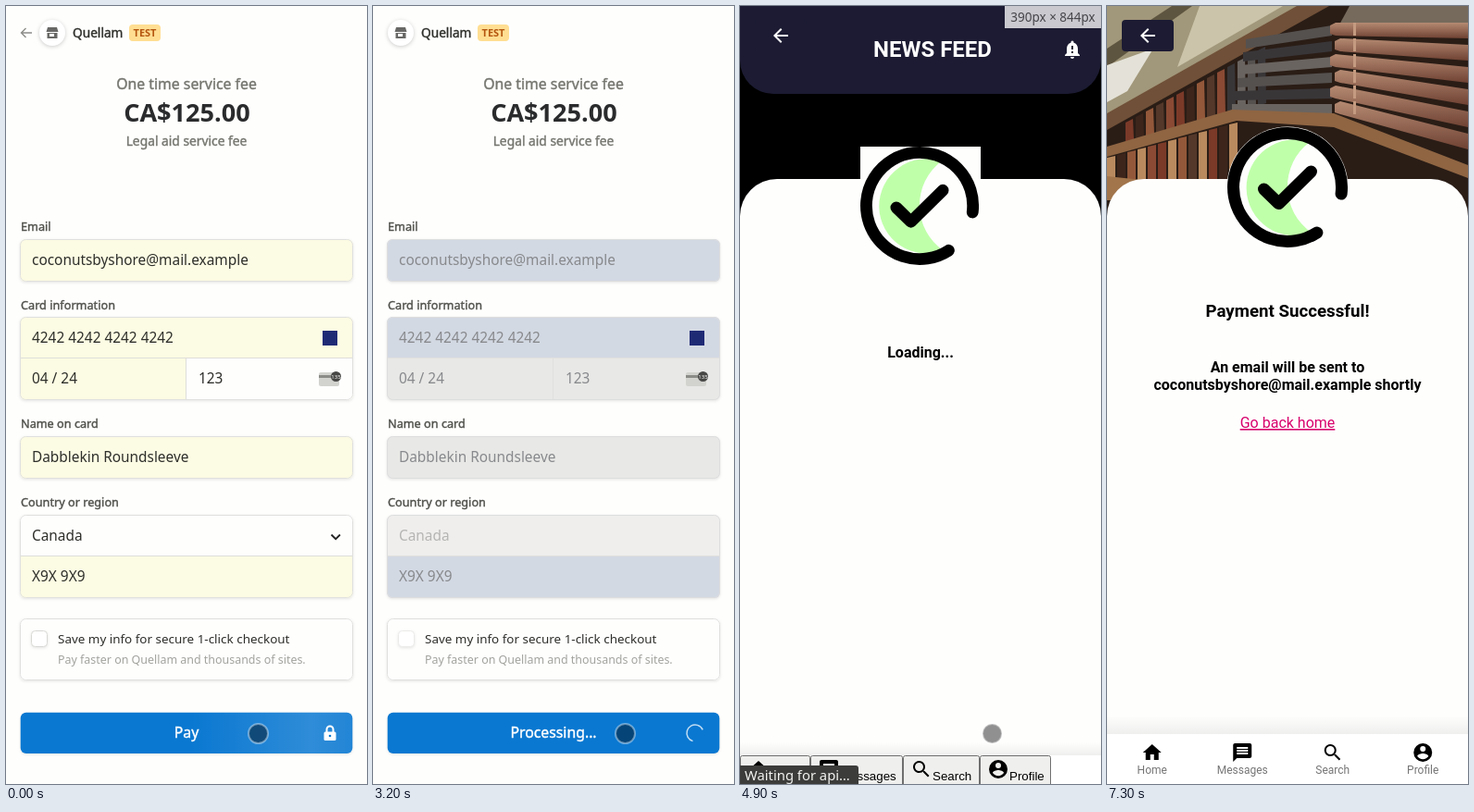
Animation of 390 by 841 pixels, one loop 7.9 s. Source, as an HTML page:

```html
<!DOCTYPE html>
<html lang="en">
<head>
<meta charset="utf-8">
<title>Checkout</title>
<style>
  html, body { margin: 0; width: 100%; height: 100%; overflow: hidden; background: #fefefd; }
  svg { display: block; }
  text { font-family: "Noto Sans", "Open Sans", sans-serif; white-space: pre; stroke-width: 0; }
  .mid { text-anchor: middle; }
  .med { stroke-width: .4px; }
  .bold { font-weight: 700; }
  .rob { font-family: Roboto, sans-serif; }
  .arial { font-family: "Liberation Sans", Arial, sans-serif; }
  .lift { filter: drop-shadow(0 1px 1.5px rgba(0,0,0,.1)); }
  .cells { clip-path: inset(0 round 6px); }
</style>
</head>
<body>
<svg id="stage" width="390" height="841" viewBox="0 0 390 841"></svg>
<script>
const LOOP = 7900, STEP = 100;
const PAPER = '#fefefd', NAVY = '#1c1b33', EMAIL = 'coconutsbyshore@mail.example', SHOP = 'Quellam';

const ICONS = {
  back: 'M20 11H7.83l5.59-5.59L12 4l-8 8 8 8 1.41-1.41L7.83 13H20z',
  home: 'M10 20v-6h4v6h5v-8h3L12 3 2 12h3v8z',
  chat: 'M20 2H4c-1.1 0-2 .9-2 2v18l4-4h14c1.1 0 2-.9 2-2V4c0-1.1-.9-2-2-2zm-2 12H6v-2h12zm0-3H6V9h12zm0-3H6V6h12z',
  find: 'M15.5 14h-.79l-.28-.27A6.5 6.5 0 1 0 13.73 14.43l.27.28v.79l5 4.99L20.49 19zm-6 0a4.5 4.5 0 1 1 0-9 4.5 4.5 0 0 1 0 9z',
  user: 'M12 2a10 10 0 1 0 0 20 10 10 0 0 0 0-20zm0 3a3 3 0 1 1 0 6 3 3 0 0 1 0-6zm0 14.2c-2.5 0-4.71-1.28-6-3.22.03-1.99 4-3.08 6-3.08s5.97 1.09 6 3.08c-1.29 1.94-3.5 3.22-6 3.22z',
  bell: 'M18 16v-5c0-3.07-1.64-5.64-4.5-6.32V4a1.5 1.5 0 0 0-3 0v.68C7.63 5.36 6 7.92 6 11v5l-2 2v1h16v-1zm-5 0h-2v-2h2zm0-4h-2V8h2zm-1 10a2 2 0 0 0 2-2h-4a2 2 0 0 0 2 2z'
};
const NAV = [['home', 'Home'], ['chat', 'Messages'], ['find', 'Search'], ['user', 'Profile']];

// Drawing helpers, all returning SVG markup
const text = (x, y, size, str, fill, cls = '', more = '') =>
  `<text x="${x}" y="${y}" font-size="${size}" fill="${fill}" stroke="${fill}" class="${cls}" ${more}>${str}</text>`;
const rect = (x, y, w, h, fill, r = 0, more = '') =>
  `<rect x="${x}" y="${y}" width="${w}" height="${h}" rx="${r}" fill="${fill}" ${more}/>`;
const poly = (points, fill) => `<polygon points="${points}" fill="${fill}"/>`;
const icon = (name, x, y, fill = '#000') =>
  `<path d="${ICONS[name]}" transform="translate(${x} ${y})" fill="${fill}" fill-rule="evenodd"/>`;

const box = (y, h, cells, off) => `<g class="lift"><g class="cells">${cells}</g>
  ${rect(15.5, y + .5, 359, h - 1, 'none', 6, `stroke="${off ? '#dcdddd' : '#e0e0df'}"`)}</g>`;

function form(off) {
  const auto = off ? '#d3d9e3' : '#fcfbe3';
  const typed = off ? '#e8e8e6' : '#fcfbe3';
  const plain = off ? '#e8e8e6' : PAPER;
  const ink = off ? '#87898c' : '#2e2f2b';
  const rule = off ? '#e0e0de' : '#dededa';
  const value = (x, y, str, fill = ink) => text(x, y, 15.4, str, fill);
  const label = (y, str) => text(16, y, 12.7, str, '#50514c', 'med');
  const row = (y, h, fill) => rect(15, y, 360, h, fill);
  return label(243, 'Email') + box(252, 46, row(252, 46, auto), off) + value(28, 280, EMAIL)
    + label(328, 'Card information')
    + box(336, 90, row(336, 44, auto) + row(380, 46, typed) + rect(195, 380, 180, 46, plain)
      + row(380, 1, rule) + rect(194, 380, 1, 46, rule), off)
    + value(28, 364, '4242 4242 4242 4242') + value(28, 408, '04 / 24') + value(208, 408, '123')
    + rect(342, 351, 16, 16, '#1f2a75')
    + rect(338, 396, 22, 15, '#d2d2cf', 2) + rect(338, 399, 22, 3, '#8b8b88')
    + '<circle cx="356.5" cy="400.5" r="5.5" fill="#474745"/>' + text(356.5, 403, 6, '135', '#fff', 'mid')
    + label(456, 'Name on card') + box(465, 46, row(465, 46, typed), off) + value(28, 493, 'Dabblekin Roundsleeve')
    + label(541, 'Country or region')
    + box(550, 90, row(550, 44, off ? '#efeeed' : PAPER) + row(594, 46, auto) + row(594, 1, rule), off)
    + value(28, 578, 'Canada', off ? '#b5b5b3' : ink) + value(28, 622, 'X9X 9X9')
    + (off ? '' : '<path d="M351.5 571.5l4.7 4.7 4.7-4.7" fill="none" stroke="#222" stroke-width="1.8"/>')
    + box(662, 67, rect(15, 662, 360, 67, PAPER))
    + rect(27.5, 675.5, 17, 17, '#fff', 4, `class="lift" stroke="${off ? '#ebebe9' : '#d8d8d5'}"`)
    + text(56, 689, 13.45, 'Save my info for secure 1-click checkout', '#2e2f2b')
    + text(56, 711, 12.45, `Pay faster on ${SHOP} and thousands of sites.`, '#a2a29e');
}

const checkout = rect(0, 0, 390, 841, PAPER)
  + '<path id="leave" d="M28 29H16.500M21.500 24l-5 5 5 5" fill="none" stroke="#8c8c89" stroke-width="1.4"/>'
  + `<g id="shop"><circle cx="50" cy="29" r="14" fill="#fff" style="filter:drop-shadow(0 1px 2px rgba(0,0,0,.2))"/>
     <path d="M45 23h10l1.500 5h-13zM44.500 29h11v6h-11zm2.500 1v3h5v-3z" fill="#686866" fill-rule="evenodd"/>`
  + text(72, 34, 13.7, SHOP, '#2e2f2b', 'med') + rect(133, 20, 34, 18, '#ffde92', 4)
  + text(150, 32.700, 11, 'TEST', '#b4560f', 'mid bold') + '</g>'
  + text(195, 90, 15.8, 'One time service fee', '#75766f', 'mid med')
  + text(195.500, 125, 27.1, 'CA$125.00', '#2a2b2c', 'mid bold')
  + text(195, 151, 13.8, 'Legal aid service fee', '#75766f', 'mid med')
  + `<g id="live">${form(false)}</g><g id="frozen">${form(true)}</g>`
  + `<g class="lift">${rect(15.7, 763.7, 358.6, 44.4, '#0a78d1', 6, 'id="button"')}</g>
     <g clip-path="url(#buttonShape)">${rect(0, 763.7, 260, 44.4, 'url(#shine)', 0, 'id="shimmer"')}</g>`
  + text(195, 791, 15.8, 'Pay', '#fff', 'mid med', 'id="pay"')
  + text(195, 791, 15.8, 'Processing...', '#fff', 'mid med', 'id="busy"')
  + `<g id="lock">${rect(343.5, 784.5, 13, 9.5, '#fff', 1.5)}
     <path d="M346.500 785v-3a3.500 3.500 0 0 1 7 0v3" fill="none" stroke="#fff" stroke-width="2"/>
     <circle cx="350" cy="789" r="1.300" fill="#0a78d1"/></g>`
  + `<g id="spinner" fill="none" stroke="#fff"><circle id="ring" r="9" pathLength="360" stroke-width="1.500" stroke-opacity=".75"/>
     <path id="tick" d="M-4.500 .500l3 3.200 6-7" pathLength="1" stroke-width="2" stroke-dasharray="1 2"/></g>`;

// 130 px badge, centred on the origin
const badge = `<path d="M24-49A60.500 60.500 0 0 0 26 49A52 52 0 1 1 24-49z" fill="#c0ffaa"/>
  <g fill="none" stroke="#000" stroke-width="13" stroke-linecap="round" stroke-linejoin="round">
  <path d="M31.900 49A58.500 58.500 0 1 1 58.100 7.100"/><path d="M-25.500 2l16 15.500 35-34.500"/></g>`;

const sheet = `<path d="M0 841V227a40 40 0 0 1 40-40h310a40 40 0 0 1 40 40v614z" fill="${PAPER}"/>`;
const backButton = rect(16, 15, 56, 34, NAVY, 4) + icon('back', 32, 20, '#fff');

const slots = [[0, 76], [76, 100], [176, 83], [259, 77]];
const loading = rect(0, 0, 390, 300, '#000')
  + `<path d="M0 0h390v59a36 36 0 0 1-36 36H36a36 36 0 0 1-36-36z" fill="${NAVY}"/>` + backButton
  + text(208, 55, 24, 'NEWS FEED', '#fff', 'mid rob bold') + icon('bell', 347, 35, '#fff')
  + sheet + rect(130, 152, 130, 130, PAPER)
  + `<g transform="translate(194 216) scale(.985)">${badge}</g>`
  + text(195, 380, 16, 'Loading...', '#000', 'mid rob bold')
  + rect(0, 796, 390, 14, 'url(#fade)') + rect(0, 810, 390, 31, '#fff')
  + NAV.map(([name, label], i) => {
      const [x, w] = slots[i];
      return rect(x + .5, 810.5, w - 1, 34, '#efefed', 2, 'stroke="#6f6f6f"')
        + icon(name, x + 8, 813) + text(x + 32, 837, 13.33, label, '#000', 'arial');
    }).join('');

function shelves() {
  const spines = ['#7b3a28', '#3d251b', '#93583a', '#54382a', '#8a4a34'];
  const greys = ['#55514f', '#393638', '#6a6460'];
  // Window wall and the upper beam
  let out = rect(0, 0, 390, 235, '#2a1d16')
    + poly('0,0 215,0 0,118', '#a1977a') + poly('0,46 70,0 92,0 0,66', '#5e5540')
    + poly('0,64 50,46 22,92 0,104', '#e4e2d8') + poly('100,0 190,0 76,66', '#cbc4aa')
    + poly('0,116 205,0 240,0 0,134', '#705038')
    + poly('262,0 390,0 390,30 250,22', '#766a5c');
  // Small standing books, then the dark stack beside them
  for (let i = 0; i < 14; i++) {
    const x = 20 + i * 11, y = 126 - i * 6;
    out += poly(`${x},${y} ${x + 8},${y - 4} ${x + 9},${144 - i * 3} ${x},${147 - i * 3}`, i < 10 ? spines[i % 5] : greys[i % 3]);
  }
  for (let i = 0; i < 6; i++) {
    const y = 26 + i * 14;
    out += poly(`${150 - i * 3},${y + 10} 243,${y - 5 + i * 3} 243,${y + 6 + i * 3} ${150 - i * 3},${y + 20}`, greys[i % 3]);
  }
  // Shelf board and the row below it
  out += poly('0,152 135,112 245,116 390,172 390,186 245,131 140,124 0,163', '#8f6542');
  for (let i = 0; i < 13; i++) {
    const x = i * 11, y = 164 - i * 3;
    out += poly(`${x},${y} ${x + 9},${y - 2} ${x + 9},${186 + i} ${x},${186 + i}`, i % 3 ? spines[i % 5] : '#b98a5e');
  }
  out += poly('0,184 140,199 140,210 0,210', '#a2754b');
  // Large stacked volumes on the right
  for (let i = 0; i < 6; i++) {
    const x = 241 + i % 2 * 5, y = 18 + i * 17, drop = 4 + i * 7;
    out += poly(`${x},${y + 3} ${x + 6},${y} 390,${y + drop - 4} 390,${y + drop + 13} ${x + 6},${y + 14} ${x},${y + 12}`, 'url(#leather)')
      + poly(`266,${y} 269,${y} 269,${y + 14} 266,${y + 14}`, '#c49b80');
  }
  return out;
}

const success = shelves() + sheet + backButton
  + `<g transform="translate(195 196)"><circle r="65.500" fill="${PAPER}"/>${badge}</g>`
  + `<g id="waiting">${text(195, 336, 18.72, 'Loading...', '#000', 'mid rob bold')}</g><g id="message">`
  + text(195, 336, 18.72, 'Payment Successful!', '#000', 'mid rob bold')
  + text(195, 396, 16, 'An email will be sent to', '#000', 'mid rob bold')
  + text(195, 415, 16, `${EMAIL} shortly`, '#000', 'mid rob bold')
  + text(195, 456, 16, 'Go back home', '#d8006c', 'mid rob', 'text-decoration="underline"') + '</g>'
  + rect(0, 767, 390, 20, 'url(#fade)') + rect(0, 787, 390, 54, '#fff')
  + NAV.map(([name, label], i) => icon(name, 36.750 + i * 97.5, 795)
      + text(48.75 + i * 97.5, 830, 12, label, '#757575', 'mid rob')).join('');

const stage = document.getElementById('stage');
stage.innerHTML = `<defs>
  <linearGradient id="shine"><stop stop-color="#fff" stop-opacity="0"/><stop offset=".5" stop-color="#fff" stop-opacity=".15"/><stop offset="1" stop-color="#fff" stop-opacity="0"/></linearGradient>
  <linearGradient id="fade" x2="0" y2="1"><stop stop-opacity="0"/><stop offset="1" stop-opacity=".06"/></linearGradient>
  <linearGradient id="leather" x2="0" y2="1"><stop stop-color="#b58a72"/><stop offset="1" stop-color="#6f4233"/></linearGradient>
  <clipPath id="buttonShape">${rect(15.7, 763.7, 358.6, 44.4, '#000', 6)}</clipPath></defs>
  <g id="checkout">${checkout}</g><g id="loading">${loading}</g><g id="success">${success}</g>
  <g id="size">${rect(286, 0, 104, 24, '#c9c9cf')}${text(338, 17, 13.5, '390px × 844px', '#45454a', 'mid')}</g>
  <g id="status"><path d="M0 821h125a3 3 0 0 1 3 3v17H0z" fill="#3c3c3a"/>${text(5, 837, 14.8, 'Waiting for api…', '#f2f2f0')}</g>
  <circle id="cursor" r="10.500" fill="#000" fill-opacity=".43" stroke="#fff" stroke-opacity=".4" stroke-width="2"/>`;

const el = id => document.getElementById(id);
const show = (id, on) => el(id).setAttribute('opacity', +on);
const set = (id, attrs) => { for (const k in attrs) el(id).setAttribute(k, attrs[k]); };
const ramp = (t, a, b) => Math.min(1, Math.max(0, (t - a) / (b - a)));
const mix = (a, b, k) => a.map((v, i) => v + (b[i] - v) * k);

// Pointer stops: start time, x, y
const POINTER = [[0, 272.5, 786.5], [5500, 268.5, 769.5], [5700, 146.5, 308.5], [6300, 155.5, 270.5],
  [6500, 136, 200], [6600, 96, 104], [6700, 70.5, 47.5], [6800, 138, 72], [6900, 232, 126],
  [7000, 306.5, 177.5], [7200, 58.5, 18.5]];

function render(t) {
  show('checkout', t < 4900);
  show('loading', t >= 4900 && t < 5100);
  show('success', t >= 5100);
  show('waiting', t < 5300);
  show('message', t >= 5300);
  show('size', t >= 4900 && t < 5300);
  show('status', t >= 4700 && t < 5300);

  const frozen = t >= 600;
  show('leave', !frozen);
  show('live', !frozen);
  show('frozen', frozen);
  set('shop', { transform: `translate(${frozen ? -20 : 0})` });

  const flash = Math.max(0, 1 - Math.abs(t - 800) / 250);
  const blue = mix([10, 120, 209], [29, 139, 210], flash);
  set('button', { fill: `rgb(${mix(blue, [43, 191, 124], ramp(t, 3500, 3800))})` });
  set('shimmer', { x: 200 + t * .6 });
  show('shimmer', t < 300);
  show('pay', 1 - ramp(t, 500, 800));
  show('lock', 1 - ramp(t, 600, 1100));
  show('busy', ramp(t, 800, 1100) * (1 - ramp(t, 3400, 3700)));

  const slide = 1 - (1 - ramp(t, 3500, 4030)) ** 2;
  const arc = 230 + 130 * ramp(t, 3500, 3800);
  show('spinner', ramp(t, 900, 1200));
  set('spinner', { transform: `translate(${348 - 153 * slide} 786)` });
  set('ring', { r: 9 + slide, transform: `rotate(${70 + (t - 2100) * .36})`, 'stroke-dasharray': `${arc} ${360 - arc}` });
  set('tick', { 'stroke-dashoffset': 1 - ramp(t, 3850, 4300) });
  show('tick', t >= 3900);

  const [, x, y] = POINTER.filter(stop => stop[0] <= t).pop();
  set('cursor', { cx: x, cy: y });
  show('cursor', t < 7300);
}

function tick() {
  const t = performance.now() % LOOP;
  render(Math.floor(t / STEP) * STEP);
  requestAnimationFrame(tick);
}
tick();
</script>
</body>
</html>
```
